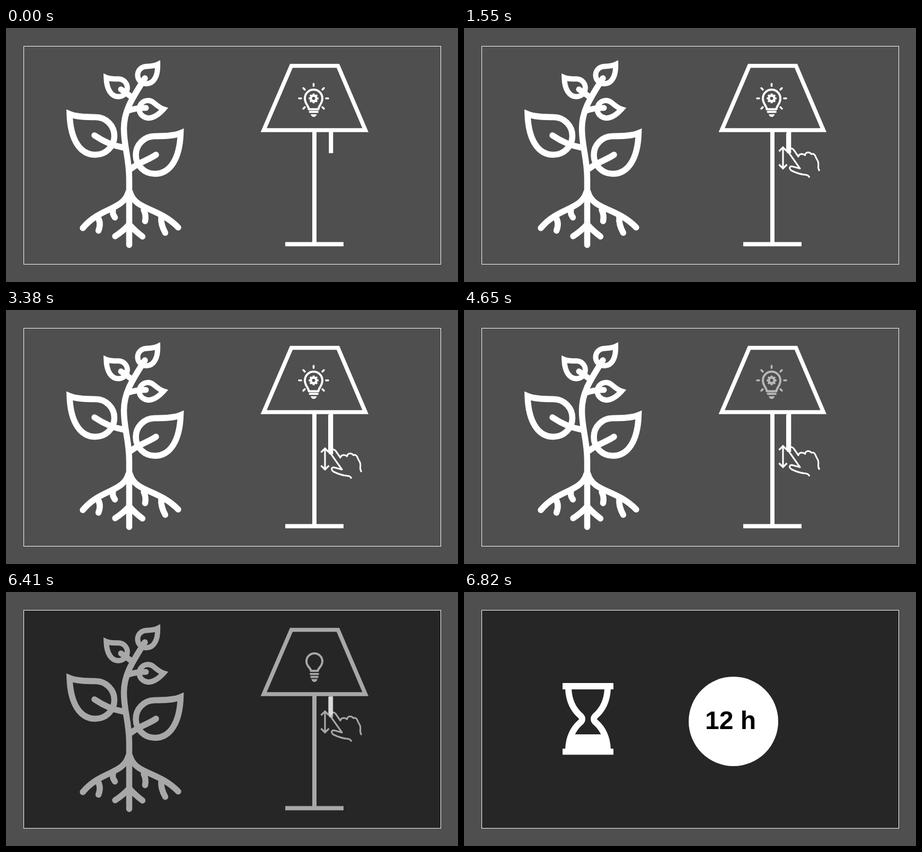
An HTML page with a canvas that plays this animation: 853x480 px, repeating every 8 s.

```html
<!DOCTYPE html>
<html lang="en">
<head>
<meta charset="utf-8">
<title>Plant, lamp and timer</title>
<style>
html, body { margin: 0; width: 100%; height: 100%; overflow: hidden; background: #4f4f4f; }
canvas { display: block; }
</style>
</head>
<body>
<canvas id="stage" width="853" height="480"></canvas>
<script>
const LOOP = 8000, WHITE = '#fff', GREY = '#4f4f4f', DARK = '#262626';
const stage = document.getElementById('stage');
const screen = stage.getContext('2d');
const buffer = document.createElement('canvas');
buffer.width = stage.width;
buffer.height = stage.height;
const g = buffer.getContext('2d');

const clamp = v => Math.max(0, Math.min(1, v));

// Transitions advance in discrete ticks
const ticks = (t, start, count, gap = 70) =>
  Math.max(0, Math.min(count, Math.floor((t - start) / gap) + 1));
const fadeOut = k => clamp(1 - 0.4 * k);
const fadeIn = k => clamp((k - 4) / 3);

function layer(alpha, draw) {
  if (alpha <= 0) return;
  g.clearRect(0, 0, buffer.width, buffer.height);
  g.fillStyle = g.strokeStyle = WHITE;
  g.miterLimit = 10;
  draw();
  screen.globalAlpha = alpha;
  screen.drawImage(buffer, 0, 0);
  screen.globalAlpha = 1;
}

function line(d, width, cap = 'round', join = 'round') {
  g.lineWidth = width;
  g.lineCap = cap;
  g.lineJoin = join;
  g.stroke(new Path2D(d));
}

const fill = d => g.fill(new Path2D(d));

function disc(x, y, r) {
  g.beginPath();
  g.arc(x, y, r, 0, 2 * Math.PI);
  g.fill();
}

// Teardrop around its round centre, tip to the upper left unless flipped
function leaf(x, y, size, width, flip = 1, turn = 0) {
  g.save();
  g.translate(x, y);
  g.rotate(turn);
  g.scale(size * flip, size);
  line('M-48.5-41.4C-36-36-18-35.5 1-35.5A35.5 35.5 0 0 1 0 35.5C-28 35.5-47 8-48.5-41.4Z',
    width / size, 'butt', 'miter');
  g.restore();
}

function plant() {
  line('M232.5 410V285C232.5 245 222.5 225 222.5 190C222.5 155 240 130 262 95', 11.5);
  leaf(168.5, 204, 1, 11.5);
  leaf(281, 240, 1, 11.5, -1);
  leaf(212, 113, 0.47, 10);
  leaf(265, 89, 0.46, 10, -1, -0.055);
  leaf(268, 153.5, 0.46, 10, -1, 0.7);
  line('M167 203C185 215 203 223 222 226M283 239.5C270 249 250 254 236 266', 11.5);
  line('M217 116L238 131M264 151Q245 151 231 156', 11);
  line('M231 310C221 345 178 338 145 378M234 310C244 345 287 338 325 377', 11.5);
  line('M172 356C178 364 178 374 174.5 383M293 357C292 368 296 379 300.5 387', 11.5);
  line('M202 343C200 350 203 354 205.5 358M260 344C263 350 264 358 262.5 365', 11.5);
  line('M206 393.5Q222 383 232.5 371Q243 383 257.5 394', 11.5);
}

function lamp(dy) {
  line('M538.5 71.5H626.5L678.3 193H486.3Z', 7.6, 'butt', 'miter');
  line('M582 193V408M527 408.5H637', 8, 'butt');
  g.fillRect(609.3, 196, 8, 40.5 + dy);
}

function hand(dy) {
  g.fillRect(608, 198, 8.5, 34 + dy);
  g.save();
  g.translate(0, dy);
  line('M602 227V264M594.5 233L602 225.5L609.5 233M594.5 258L602 265.5L609.5 258', 3.2, 'butt', 'miter');
  line('M652 282.5Q650 278 645 277.5Q632 276.5 618 269.5Q613.5 266 615 263Q617 260.5 621 262' +
    'L634 265.5L612.5 235Q611 230 615 228Q619 226.5 622 230L631 243' +
    'Q632 238.5 637 238Q641 238 643.5 240.5Q644.5 235.5 649 235Q653 235 656 238.5' +
    'Q660 236 663 242Q664.5 246 667.5 251Q669.5 255 668.5 262Q668.5 267 671 270', 3.1, 'butt');
  g.restore();
}

function gearBulb() {
  const x = 580.5, y = 133;
  line('M571.5 153.5C571 147 564 143 564 133A16.5 16.5 0 0 1 597 133C597 143 590 147 589.5 153.5Z', 4);
  line('M573.5 158.5H588', 4);
  fill('M575 163H586.5Q585 168 580.7 168Q576.5 168 575 163Z');
  g.lineWidth = 4.4;
  g.beginPath();
  g.arc(x, y, 5.2, 0, 2 * Math.PI);
  g.stroke();
  for (let i = 0; i < 8; i++) {
    const a = i * Math.PI / 4, c = Math.cos(a), s = Math.sin(a);
    const ray = (r1, r2, w, cap) =>
      line(`M${x + c * r1} ${y + s * r1}L${x + c * r2} ${y + s * r2}`, w, cap);
    ray(6, 9.2, 3.8, 'butt');
    if (i !== 2) ray(23.5, 27.5, 3.6, 'round');
  }
}

function plainBulb() {
  line('M575.5 149C575 143 567 141 567 131A15 15 0 0 1 597 131C597 141 589 143 588.5 149Z', 4);
  line('M575 154.8H589M576 160.5H588', 3.8);
  fill('M576 164.5H588Q586 170 582 170Q578 170 576 164.5Z');
}

function timer() {
  g.fillRect(186, 172, 96, 12);
  g.fillRect(186, 296, 96, 11.5);
  const wall = 'M197 183C198 205 206 222 220 234Q226 240 220 246C206 258 198 275 197 297';
  line(wall, 12, 'butt');
  g.save();
  g.translate(468, 0);
  g.scale(-1, 1);
  line(wall, 12, 'butt');
  g.restore();
  fill('M206 269H262L271 297H197Z');
  disc(508.5, 244.5, 84.5);
  g.fillStyle = '#000';
  g.font = 'bold 48px "Liberation Sans", Arial, sans-serif';
  g.fillText('12 h', 455, 258.5);
}

function draw(t) {
  const night = ticks(t, 4650, 8);
  const swap = ticks(t, 6410, 7, 68);
  const dy = 36 * (ticks(t, 2890, 8) - night) / 8;
  const scene = fadeOut(swap);

  screen.fillStyle = GREY;
  screen.fillRect(0, 0, stage.width, stage.height);
  screen.globalAlpha = fadeIn(night);
  screen.fillStyle = DARK;
  screen.fillRect(33, 34, 788, 413);
  screen.globalAlpha = 1;
  screen.strokeStyle = WHITE;
  screen.lineWidth = 1;
  screen.strokeRect(33.5, 34.5, 787, 412);

  layer(scene, () => { plant(); lamp(dy); });
  layer(fadeOut(night), gearBulb);
  layer(fadeIn(night) * scene, plainBulb);
  layer(ticks(t, 1340, 4) / 4 * scene, () => hand(dy));
  layer(fadeIn(swap), timer);
}

function tick() {
  draw(performance.now() % LOOP);
  requestAnimationFrame(tick);
}
tick();
</script>
</body>
</html>
```
